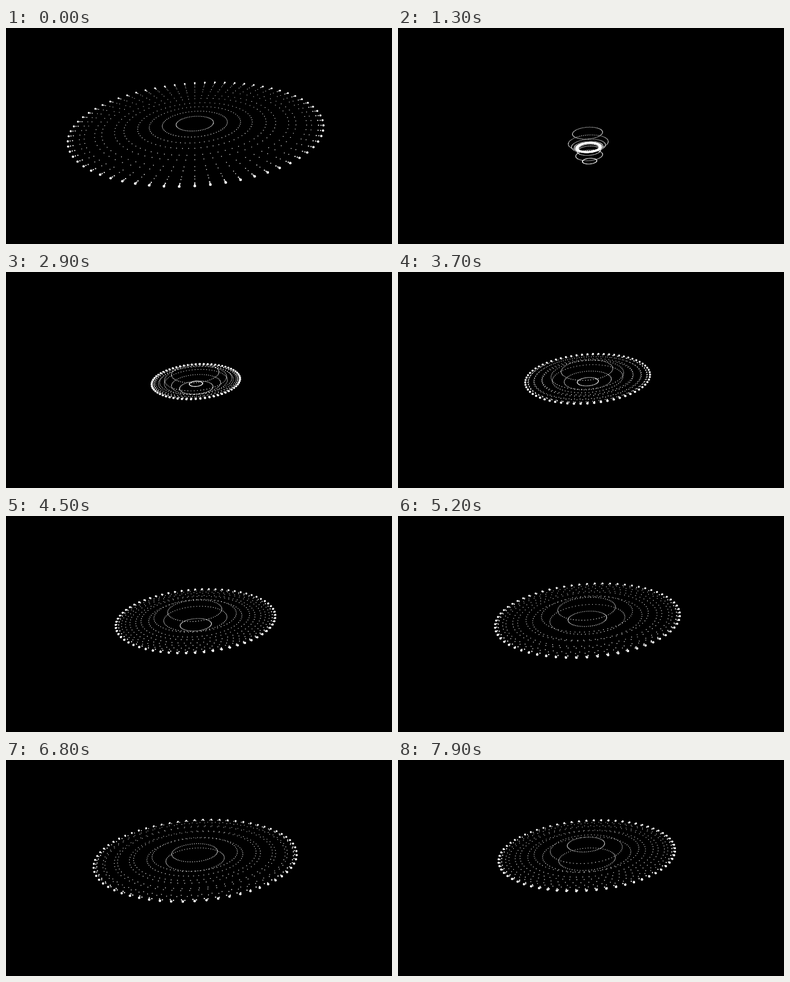
Write an HTML page with a canvas that moves like this. It is 640 by 360 pixels and loops after 8000 ms.

```html
<!DOCTYPE html>
<html>
<head>
<meta charset="utf-8">
<style>
html, body { margin: 0; width: 100%; height: 100%; overflow: hidden; background: #000; }
canvas { display: block; width: 640px; height: 360px; }
</style>
</head>
<body>
<canvas id="stage" width="640" height="360"></canvas>
<script>
const ctx = document.getElementById('stage').getContext('2d');
const LOOP = 8000, STEP = 100;
const RINGS = 13, DOTS = 64;
const ORIGIN = { x: 313, y: 159 };
const TILT = 0.393, ROLL = 0.075, DEPTH = 0.00104;

// Motion of the two end rings (near, far) and of the bulge between them.
const times = [0, 0.4, 0.9, 1.3, 2.9, 4.5, 5.8, 6.8, 7.9];
const tracks = {
  level:   [159, 190, 203, 199, 180.4, 168, 162, 156, 150.5],
  lowDrop: [0, 124, 40, 23, 6, 13, 1, 9, 14],
  topDrop: [0, -15, -25, -24, -12, -11, -10, -2, -10],
  lag:     [0, 0, 5, 5.5, 10, -2, 9, 0, 0],
  lowR:    [31, 20, 14, 12, 11, 26, 37.5, 48.5, 47],
  topR:    [54, 40, 29, 25, 39.5, 45, 48.5, 38, 31],
  bulge:   [165, 100, 22, 1, 48, 96, 121, 123, 106],
  flare:   [0, 0, 5, 9, 2, 0, 0, 0, 0],
  twist:   [0, 0.05, 0.1, 0.1, 0.1, 0.12, 0.12, 0.18, 0.12]
};

function slope(v, i) {
  const a = Math.max(i - 1, 0), b = Math.min(i + 1, v.length - 1);
  return (v[b] - v[a]) / (times[b] - times[a]);
}

// Smooth cubic curve through the keys.
function sample(v, t) {
  let i = 0;
  while (i < times.length - 2 && t > times[i + 1]) i++;
  const h = times[i + 1] - times[i];
  const s = Math.min((t - times[i]) / h, 1);
  const s2 = s * s, s3 = s2 * s;
  return v[i] * (2 * s3 - 3 * s2 + 1) + v[i + 1] * (3 * s2 - 2 * s3)
    + h * (slope(v, i) * (s3 - 2 * s2 + s) + slope(v, i + 1) * (s3 - s2));
}

const fade = x => Math.exp(-1.1 * x);
const ripple = x => x * x * Math.exp(2 - 2 * x);
const cosRoll = Math.cos(ROLL), sinRoll = Math.sin(ROLL);

function drawRing(i, p) {
  const u = i / (RINGS - 1), j = RINGS - 1 - i;
  const arch = Math.sin(Math.PI * u);
  const r = Math.abs(p.lowR + (p.topR - p.lowR) * u + p.bulge * arch
    + p.flare * (ripple(i) + ripple(j)));
  const drop = p.level - ORIGIN.y + p.lowDrop * fade(i)
    + p.topDrop * fade(j) + p.lag * ripple(i);
  const size = 0.65 + 1.1 * Math.pow(arch, 40);
  const turn = 0.3 / DOTS * 2 * Math.PI + p.twist * (u - 0.5);

  for (let n = 0; n < DOTS; n++) {
    const a = n / DOTS * 2 * Math.PI + turn;
    const zoom = 1 / (1 - r * DEPTH * Math.sin(a));
    const x = r * Math.cos(a) * zoom;
    const y = r * TILT * Math.sin(a) * zoom + drop;
    ctx.beginPath();
    ctx.arc(ORIGIN.x + x * cosRoll + y * sinRoll,
      ORIGIN.y + y * cosRoll - x * sinRoll, size * zoom, 0, 2 * Math.PI);
    ctx.fill();
  }
}

function draw(now) {
  const t = Math.floor((now % LOOP) / STEP) * STEP / 1000;
  const p = {};
  for (const name in tracks) p[name] = sample(tracks[name], t);
  ctx.fillStyle = '#000';
  ctx.fillRect(0, 0, 640, 360);
  ctx.fillStyle = '#fff';
  for (let i = 0; i < RINGS; i++) drawRing(i, p);
}

const start = performance.now();
function loop() {
  draw(performance.now() - start);
  requestAnimationFrame(loop);
}
loop();
</script>
</body>
</html>
```
